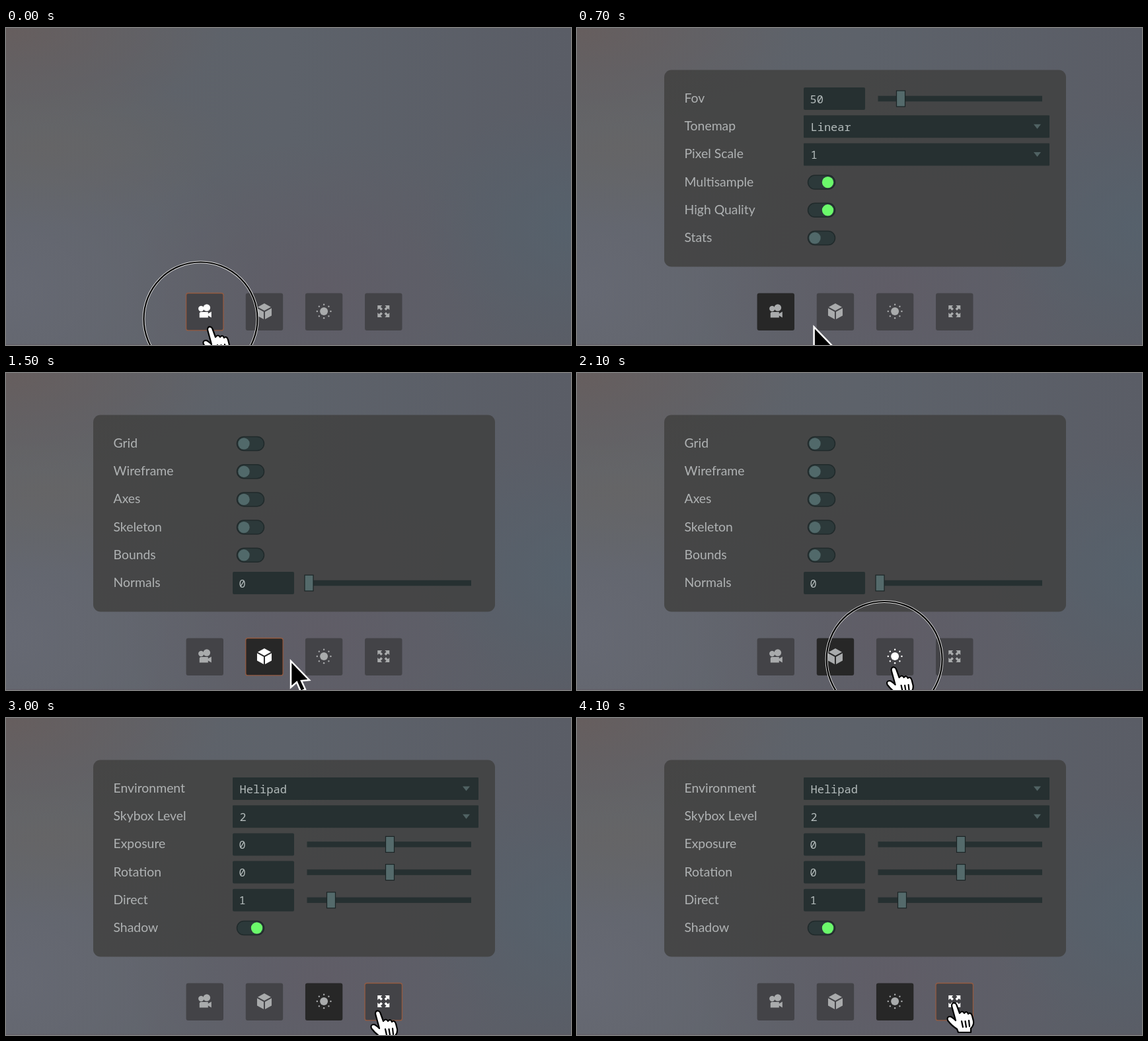
Recreate the animation shown at these times as an HTML page. Size 855 px wide and 480 px high, loop 4.2 s.

```html
<!DOCTYPE html>
<html>
<head>
<meta charset="utf-8">
<style>
html, body { margin: 0; width: 100%; height: 100%; overflow: hidden; }
body {
  background:
    linear-gradient(#0000 478px, #5d515988 480px),
    radial-gradient(ellipse 230px 190px at 855px 300px, #55626dcc, #55626d00),
    radial-gradient(ellipse 300px 230px at 480px 400px, #605c66dd, #605c6600),
    radial-gradient(ellipse 330px 150px at 0 0, #665e5e, #665e5e00),
    radial-gradient(ellipse 280px 120px at 60px 180px, #666565cc, #66656500),
    radial-gradient(ellipse 380px 300px at 0 400px, #666973, #66697300),
    linear-gradient(90deg, #606369, #5d626a 50%, #5a5d66);
}
svg { display: block; position: absolute; left: 0; top: 0; }
.label { font: 19.4px Lato, sans-serif; fill: #afb2b3; }
.value { font: 17px "Noto Sans Mono", monospace; fill: #b4bcbc; }
.well { fill: #263031; }
.thumb { fill: #546a6b; stroke: #1c2526; stroke-width: 1.2; }
.box { fill: #434347; }
.selected .box { fill: #272727; }
.hot .box { stroke: none; }
.edge .box { stroke: #955b41; stroke-width: 1.3; }
.icon { fill: #a9abac; }
.hot .icon { fill: #fff; }
</style>
</head>
<body>
<svg id="stage" width="855" height="480" viewBox="0 0 855 480"></svg>
<script>
const stage = document.getElementById('stage');

// Panel controls, drawn around the row's middle line y
const label = (y, s) => `<text class="label" x="162.5" y="${y + 6}">${s}</text>`;
const value = (x, y, s) => `<text class="value" x="${x}" y="${y + 6.5}">${s}</text>`;
const well = (x, y, w, h, r = 2) =>
  `<rect class="well" x="${x}" y="${y - h / 2}" width="${w}" height="${h}" rx="${r}"/>`;

const select = s => y => well(343, y, 372, 34, 1) + value(353.5, y, s) +
  `<path d="M691 ${y - 3.5}h11l-5.500 7z" fill="#506263"/>`;

const slider = (s, x) => y => well(343, y, 93, 34) + value(352.5, y, s) + well(455.5, y, 248.5, 8.5, 0) +
  `<rect class="thumb" x="${x - 6.5}" y="${y - 12}" width="13" height="24"/>`;

const toggle = on => y =>
  `<rect x="349.500" y="${y - 10.5}" width="41" height="21" rx="10.500" fill="#2c393a" stroke="#202a2b" stroke-width="1.500"/>
   <circle cx="${on ? 379.5 : 360}" cy="${y}" r="8.700" fill="${on ? '#6bfa6b' : '#51696a'}"/>`;

const panels = [
  { 'Fov': slider('50', 490), 'Tonemap': select('Linear'), 'Pixel Scale': select('1'),
    'Multisample': toggle(true), 'High Quality': toggle(true), 'Stats': toggle(false) },
  { 'Grid': toggle(false), 'Wireframe': toggle(false), 'Axes': toggle(false),
    'Skeleton': toggle(false), 'Bounds': toggle(false), 'Normals': slider('0', 458.5) },
  { 'Environment': select('Helipad'), 'Skybox Level': select('2'), 'Exposure': slider('0', 581),
    'Rotation': slider('0', 581), 'Direct': slider('1', 492), 'Shadow': toggle(true) }
];

const panelMarkup = rows => '<g class="panel">' +
  '<rect x="132" y="63.500" width="608" height="298" rx="11" fill="#3f3f3ecc"/>' +
  Object.entries(rows).map(([name, control], i) => {
    const y = 107 + i * 42.2;
    return label(y, name) + control(y);
  }).join('') + '</g>';

// Icons, centred on the origin
const dots = Array.from({ length: 8 }, (_, i) =>
  `<circle cx="0" cy="-10.300" r="1.200" transform="rotate(${i * 45})"/>`).join('');
const arrows = [0, 90, 180, 270].map(a =>
  `<path d="M-9-9h7l-2.300 2.300 3 3-2.400 2.400-3-3-2.300 2.300z" transform="rotate(${a})"/>`).join('');
const icons = [
  `<circle cx="-5.500" cy="-4" r="4.200"/><circle cx="3" cy="-5.500" r="5.300"/>
   <path d="M-6.500 1h11.500v2.500l5-3v9l-5-3v3h-13v-7z"/>`,
  '<path d="M0-12 10-6.500 0-1-10-6.500zM-11-4.700-1 .8V12L-11 6.500zM11-4.700 1 .8V12L11 6.500z"/>',
  `<circle r="6"/>${dots}`,
  arrows
];
const buttonMarkup = (icon, i) => {
  const x = 300.8 + i * 90.15;
  return `<g class="button" transform="translate(${x} 429.700)">
    <rect class="box" x="-28.200" y="-28.200" width="56.400" height="56.400" rx="3"/>
    <g class="icon" transform="translate(0 -.7)">${icon}</g></g>`;
};

stage.innerHTML = panels.map(panelMarkup).join('') + icons.map(buttonMarkup).join('') + `
  <g id="ring" fill="none">
    <circle stroke="#ddd" stroke-width="4"/><circle stroke="#000" stroke-width="2.200"/>
  </g>
  <g id="hand" stroke="#000" stroke-width="2.200" stroke-linejoin="round" stroke-linecap="round">
    <path fill="#fff" d="M-5 2Q-5-3-1-2.500 2-2 3 2L7 13Q11 8 14 13 18 9 20 14 24 11 26 17L28 25
      Q29 31 24 36L24 42H5L3 37Q-5 32-11 24-13 18-7 18-4 19 1 24z"/>
    <path fill="none" d="M10 25l2 9M15.500 25l1.500 9M21 24l1 9"/>
  </g>
  <path id="arrow" d="M0 0V40L9 32 15 46 22 43 16 30 28 29z" stroke="#fff" stroke-width="2.500"/>`;

const [ring, hand, arrow] = ['ring', 'hand', 'arrow'].map(id => document.getElementById(id));
const panelNodes = [...stage.querySelectorAll('.panel')];
const buttonNodes = [...stage.querySelectorAll('.button')];

const LOOP = 4200, STEP = 100;
// Pointer path: time, x, y
const path = [
  [0, 310, 455], [400, 310, 455], [900, 391, 451], [1200, 391, 451], [1500, 431, 436],
  [1900, 481, 448], [2400, 480, 448], [3000, 564, 446], [3200, 587, 442], [3400, 591, 441],
  [3500, 591, 441], [4100, 572, 434], [LOOP, 572, 434]
];
const during = (t, from, to) => t >= from && t < to;

function pointer(t) {
  const i = Math.max(1, path.findIndex(p => p[0] >= t));
  const [t0, x0, y0] = path[i - 1], [t1, x1, y1] = path[i];
  const k = (t - t0) / (t1 - t0);
  return [x0 + (x1 - x0) * k, y0 + (y1 - y0) * k];
}

function buttonAt(x) {
  const i = Math.floor((x - 272) / 90.15);
  return x - 272 - i * 90.15 < 58 ? i : -1;
}

const show = (node, on) => node.style.display = on ? '' : 'none';

function draw(t) {
  const [x, y] = pointer(t);
  // Hover styling trails the pointer by one step
  const hot = buttonAt(pointer(Math.max(0, t - STEP))[0]);
  const open = t < 100 ? -1 : t < 1200 ? 0 : t < 2300 ? 1 : 2;
  const plain = during(t, 100, 300) || during(t, 1000, 1200) || during(t, 2100, 2400);

  panelNodes.forEach((node, i) => show(node, i === open));
  buttonNodes.forEach((node, i) => {
    node.classList.toggle('selected', i === open);
    node.classList.toggle('hot', i === hot);
    node.classList.toggle('edge', i === hot && !plain);
  });

  const over = buttonAt(x) >= 0;
  show(hand, over);
  show(arrow, !over);
  for (const node of [hand, arrow]) node.setAttribute('transform', `translate(${x} ${y})`);

  const clickAge = t < 100 ? 100 : during(t, 1000, 1200) ? t - 1000 : t - 2100;
  show(ring, during(clickAge, 0, 200));
  ring.setAttribute('transform', `translate(${x - 15.5} ${y - 14.5})`);
  for (const circle of ring.children) circle.setAttribute('r', 87.5 - clickAge / 67);
}

const start = performance.now();
function tick() {
  const t = (performance.now() - start) % LOOP;
  draw(Math.floor(t / STEP) * STEP);
  requestAnimationFrame(tick);
}
tick();
</script>
</body>
</html>
```
